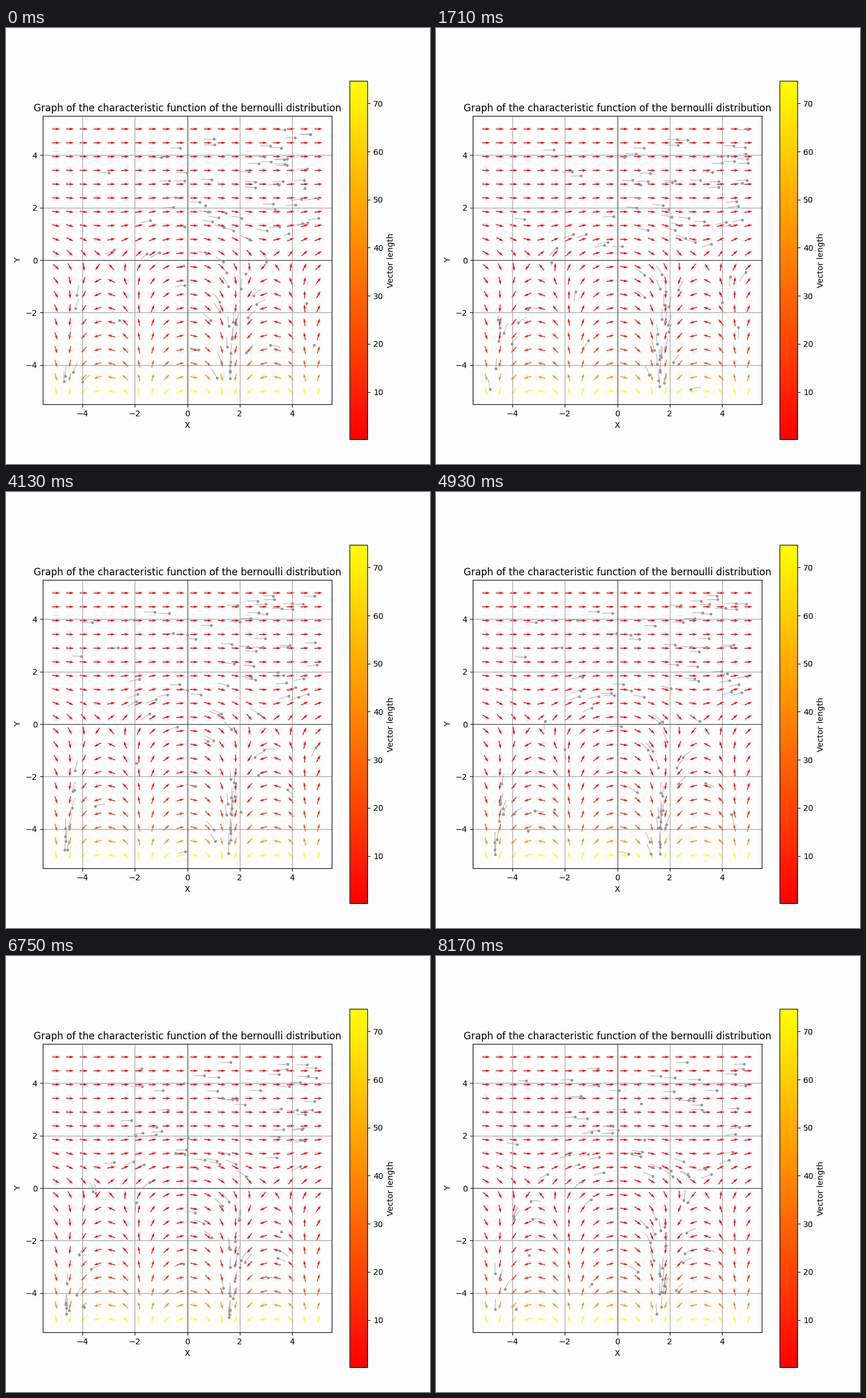
A matplotlib script for the animation above (8190 ms loop, 738 by 759 pixels).

```python
import numpy as np
import matplotlib.pyplot as plt
from matplotlib.animation import FuncAnimation
from matplotlib.collections import LineCollection

W, H, DPI = 738, 759, 101.25
LOOP, TICK = 8190, 30          # ms
DT = 10                        # ms per simulation step
STEP = 0.000716 * DT           # distance covered per step
WARMUP = 1000                  # steps run before the loop starts
TRAIL = 55                     # steps
COUNT = 100
EDGE = 5
PAPER, GREY = "#fdfdfd", "#999999"


def field(x, y):
    """Conjugate of 1/2 + 1/2 exp(iz)."""
    e = 0.5 * np.exp(-y)
    return 0.5 + e * np.cos(x), -e * np.sin(x)


def heading(p):
    u, v = field(*p.T)
    return np.stack([u, v], axis=1) / (np.hypot(u, v)[:, None] + 1e-9)


def simulate(steps):
    """Places and birth steps of all particles, for every step."""
    rng = np.random.default_rng(11)
    p = rng.uniform(-EDGE, EDGE, (COUNT, 2))
    born = np.zeros(COUNT, int)
    places, births = [], []
    for k in range(steps):
        places.append(p)
        births.append(born)
        p = p + STEP * heading(p + STEP / 2 * heading(p))
        gone = np.abs(p).max(axis=1) > EDGE
        p[gone] = rng.uniform(-EDGE, EDGE, (gone.sum(), 2))
        born = np.where(gone, k + 1, born)
    return np.array(places), np.array(births)


def clock(t):
    """Simulation step on view: two short holds, then a long one."""
    cycle, phase = divmod(t - 30, 140)
    shown = 30 + 140 * cycle + min(phase // 20 * 20, 40)
    return WARMUP + shown // DT


def box(x, y, w, h):
    return [x / W, 1 - (y + h) / H, w / W, h / H]


fig = plt.figure(figsize=((W + 0.01) / DPI, (H + 0.01) / DPI), dpi=DPI,
                 facecolor=PAPER)
ax = fig.add_axes(box(64.4, 152.95, 502.2, 502.2), facecolor=PAPER)
cax = fig.add_axes(box(598, 92.2, 31.2, 623.7))

X, Y = np.meshgrid(np.linspace(-EDGE, EDGE, 20), np.linspace(-EDGE, EDGE, 20))
U, V = field(X, Y)
size = np.hypot(U, V)
arrows = ax.quiver(X, Y, U / size, V / size, size, cmap="autumn",
                   pivot="mid", scale=36, width=0.003)
fig.colorbar(arrows, cax=cax, label="Vector length")

ax.set(xlim=(-5.5, 5.5), ylim=(-5.5, 5.5), xlabel="X", ylabel="Y",
       xticks=range(-4, 5, 2), yticks=range(-4, 5, 2),
       title="Graph of the characteristic function of the "
             "bernoulli distribution")
ax.grid(True, color="#9f9f9f")
ax.axhline(0, color="black", lw=0.5)
ax.axvline(0, color="black", lw=0.5)

trails = LineCollection([], colors=GREY, linewidths=0.6, zorder=2.5)
ax.add_collection(trails, autolim=False)
dots, = ax.plot([], [], "o", color=GREY, ms=3.5, mew=0, zorder=3)

places, births = simulate(WARMUP + LOOP // DT + 1)


def draw(frame):
    k = clock(frame * TICK)
    starts = np.maximum(births[k], k - TRAIL)
    trails.set_segments([places[s:k + 1, i] for i, s in enumerate(starts)])
    dots.set_data(*places[k].T)
    return trails, dots


anim = FuncAnimation(fig, draw, frames=LOOP // TICK, interval=TICK,
                     repeat=True, repeat_delay=0)
plt.show()
```
